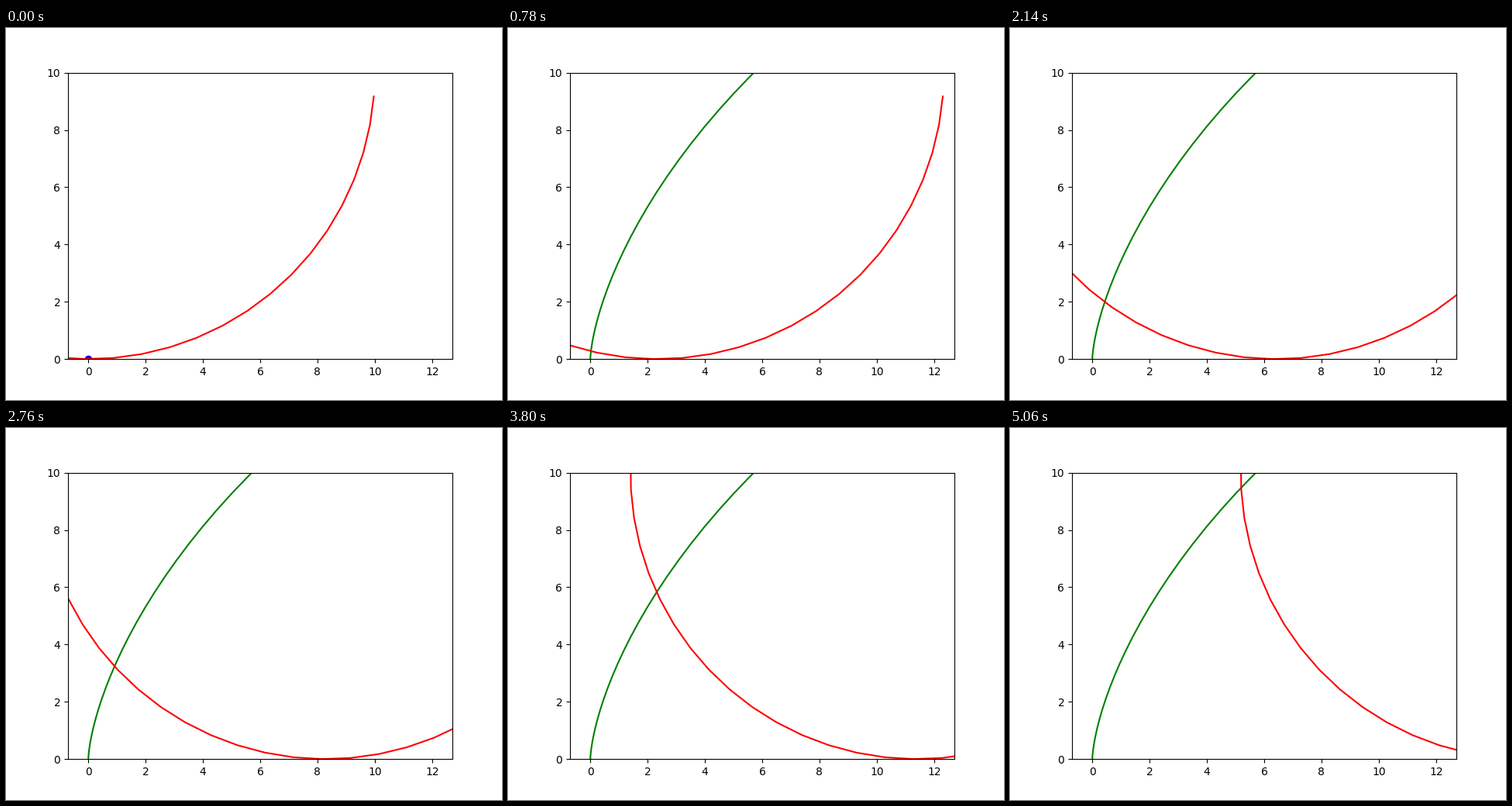
A matplotlib script that plays this animation: 640 px wide and 480 px high, repeating every 5080 ms.

```python
import numpy as np
import matplotlib.pyplot as plt
from matplotlib.animation import FuncAnimation

R = 10
STEP = 0.06
FRAMES = 254

fig, ax = plt.subplots(figsize=(6.4, 4.8), dpi=100)

# Equal scale on both axes, centred on x = 6
half = 5 * (0.775 * 640) / (0.77 * 480)
ax.set_xlim(6 - half, 6 + half)
ax.set_ylim(0, 10)

dot, = ax.plot([], [], "o", color="b")
trail, = ax.plot([], [], "-", color="g")
wheel, = ax.plot([], [], "-", color="r")

# Stops short of a full turn, leaving a small gap in the circle
theta = np.arange(0, 2 * np.pi, 0.1)


def cycloid(t):
    return R * (t - np.sin(t)), R * (1 - np.cos(t))


def update(i):
    x, y = cycloid(STEP * np.arange(i + 1))
    trail.set_data(x, y)
    dot.set_data(x[-1:], y[-1:])
    wheel.set_data(STEP * i + R * np.cos(theta), R + R * np.sin(theta))
    return dot, trail, wheel


anim = FuncAnimation(fig, update, frames=FRAMES, interval=20,
                     repeat=True, repeat_delay=0)
plt.show()
```
